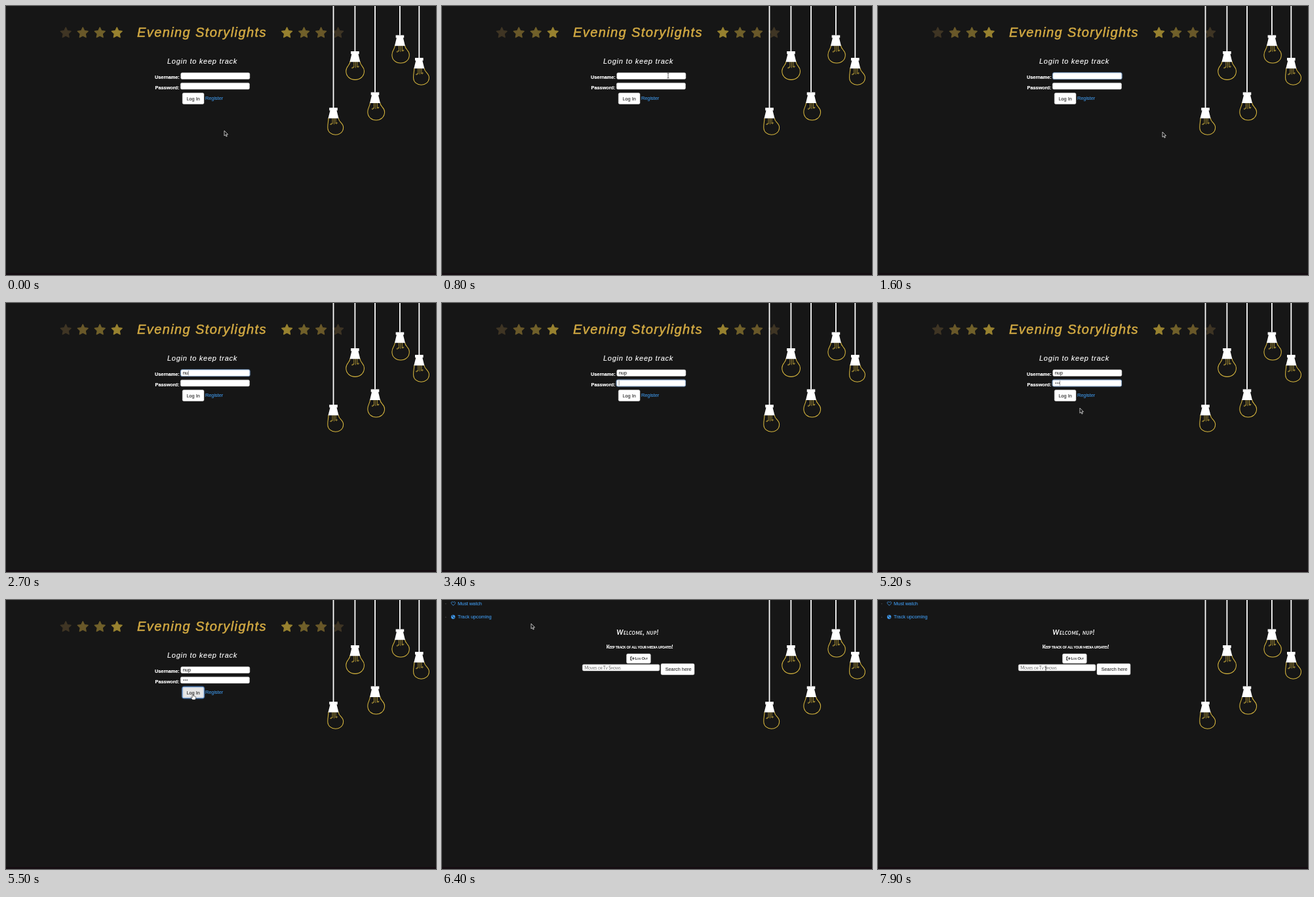
An HTML page for the animation above (8000 ms loop, 656x410 px).

```html
<!DOCTYPE html>
<html lang="en">
<head>
<meta charset="utf-8">
<title>Login walkthrough</title>
<style>
  html, body { margin: 0; width: 100%; height: 100%; overflow: hidden; background: #161616; }
  svg { display: block; }
  text { font: 7.3px "Liberation Sans", Arial, sans-serif; fill: #fff; white-space: pre; }
  .title { font-size: 20px; font-style: italic; letter-spacing: 1.4px; fill: #d4ab43; stroke: #d4ab43; stroke-width: .5; }
  .sub { font-size: 11px; font-style: italic; letter-spacing: .74px; stroke: #fff; stroke-width: .15; }
  .label { font-weight: 700; stroke: #fff; stroke-width: .2; }
  .link { fill: #3f98ea; stroke: #3f98ea; stroke-width: .1; }
  .dark { fill: #2c2c2c; }
  text.dark { stroke: #2c2c2c; stroke-width: .12; }
  .comic { font-family: Lato, "Open Sans", sans-serif; font-variant: small-caps; font-weight: 700; }
  .hello { font-size: 10.5px; font-style: italic; letter-spacing: .5px; }
  .tagline { font-size: 6.8px; font-weight: 900; letter-spacing: -.25px; }
  .out { font-size: 5.9px; letter-spacing: -.2px; fill: #2c2c2c; }
  .hint { font-size: 6.7px; font-weight: 400; letter-spacing: -.22px; fill: #666; }
  .field { fill: #fff; stroke: #ccc; stroke-width: .5; }
  .ring { fill: none; stroke: #86b4e6; stroke-width: .6; filter: drop-shadow(0 0 1px rgba(80, 140, 215, .5)); }
  #btnRing { stroke: #5a93d8; stroke-width: 1; }
  .wire { stroke: #fff; stroke-width: 1.8; }
  .glass { fill: none; stroke: #d9b83e; stroke-width: 1.05; stroke-linecap: round; }
  .thin { stroke-width: .7; }
  .icon { fill: none; stroke: #3f98ea; stroke-width: .8; stroke-linejoin: round; }
  .star { stroke-width: 1.4; stroke-linejoin: round; }
  .caret { fill: #333; }
  .pointer { fill: #111; stroke: #fff; stroke-width: .7; stroke-linejoin: round; }
</style>
</head>
<body>
<svg width="656" height="410" viewBox="0 0 656 410">
  <rect width="656" height="410" fill="#161616"/>
  <rect y="407" width="656" height="3" fill="#150d12"/>

  <g id="login">
    <g id="stars"></g>
    <text class="title" x="200" y="47.3">Evening Storylights</text>
    <text class="sub" x="246" y="87.8">Login to keep track</text>
    <text class="label" x="227" y="111.2">Username:</text>
    <text class="label" x="227.6" y="126.5">Password:</text>
    <rect class="field" x="266.7" y="101.8" width="105.2" height="9.7" rx="2"/>
    <rect class="field" x="266.3" y="117.2" width="105.2" height="9.7" rx="2"/>
    <rect class="ring" id="userRing" x="266.5" y="101.6" width="105.6" height="10.1" rx="2.2"/>
    <rect class="ring" id="passRing" x="266.1" y="117" width="105.6" height="10.1" rx="2.2"/>
    <text class="dark" id="user" x="269.8" y="109"></text>
    <g id="dots" class="dark"></g>
    <rect class="caret" id="caret" width=".5" height="7.4"/>
    <rect class="field" id="loginBtn" x="269.2" y="132.5" width="32.8" height="17" rx="2"/>
    <rect class="ring" id="btnRing" x="268.9" y="132.2" width="33.4" height="17.6" rx="2.2"/>
    <text class="dark" x="275.5" y="143.6">Log In</text>
    <text class="link" x="304" y="143.2">Register</text>
  </g>

  <g id="home">
    <circle cx="5.7" cy="5.8" r=".8" fill="#444"/>
    <circle cx="5.7" cy="26.3" r=".8" fill="#444"/>
    <path class="icon" d="M17.2 8.4L14.5 5.6C13 3.5 15.8 1.4 17.2 3.7C18.6 1.4 21.4 3.5 19.9 5.6Z"/>
    <text class="link" x="24" y="7.9">Must watch</text>
    <circle class="link" cx="17" cy="25.8" r="3.1"/>
    <path d="M15.8 23.6l1.4.5-.9 1.2-1.1.3zM17.4 26l1.6.2-.7 1.6-.9-.3z" fill="#161616"/>
    <text class="link" x="24" y="28.3">Track upcoming</text>
    <text class="comic hello" x="266.3" y="52.8">Welcome, nup!</text>
    <text class="comic tagline" x="250.8" y="74">Keep track of all your media updates!</text>
    <rect class="field" x="281.5" y="82" width="36.8" height="14.6" rx="2"/>
    <path d="M290 86.8h-2.3v4.8h2.3M289.3 89.2h3.6M291.3 87.3l2 1.9-2 1.9" fill="none" stroke="#222" stroke-width="1"/>
    <text class="comic out" x="294.6" y="91.4">Log Out</text>
    <rect class="field" x="214.3" y="98.2" width="117.6" height="9.7" rx="2"/>
    <text class="comic hint" x="217.2" y="105.6">Movies or Tv Shows</text>
    <rect class="field" x="334" y="97" width="51" height="17" rx="2"/>
    <text class="dark" x="340.7" y="108.2">Search here</text>
  </g>

  <g id="bulbs"></g>

  <g id="pointer" class="pointer">
    <path id="arrow" d="M0 0V7.8L1.8 6.2L3 9L4.3 8.4L3.1 5.7H5.5Z"/>
    <path id="hand" d="M-.8 .6Q0-.6 .8 .6V3.6Q1.6 2.9 2.1 3.8Q3 3.3 3.5 4.2Q4.6 4 4.6 5.2V6.8L3.7 9H-.6L-3 5.7Q-2.7 4.4-.8 6Z" style="fill:#fff;stroke:#222;stroke-width:.6"/>
    <path id="beam" d="M-1.5-4Q0-4 0-3V3Q0 4-1.5 4M1.5-4Q0-4 0-3M0 3Q0 4 1.5 4" style="fill:none;stroke:#222"/>
  </g>
</svg>
<script>
  const $ = id => document.getElementById(id);
  const LOOP = 8000, STEP = 100;
  const NAME = 'nup';
  const TEXT_X = 269.8, LETTER = 4.06, DOT = 2.55;
  const PRESS = 5400, LOGGED_IN = 5600;

  function drawStar(cx, cy, fill) {
    const points = Array.from({ length: 10 }, (_, i) => {
      const a = -Math.PI / 2 + i * Math.PI / 5, r = i % 2 ? 4.1 : 8.3;
      return `${cx + r * Math.cos(a)},${cy + r * Math.sin(a)}`;
    });
    return `<polygon class="star" points="${points.join(' ')}" fill="${fill}" stroke="${fill}"/>`;
  }

  const shades = ['#3f3524', '#695829', '#70602a', '#97812f'];
  $('stars').innerHTML = shades.map((c, i) =>
    drawStar(91.2 + 26 * i, 41, c) + drawStar(506.6 - 26 * i, 41, c)).join('');

  // The more a bulb leans to the right, the smaller its glass.
  function drawBulb(x, top, lean) {
    const half = 14 - .65 * lean, bottom = 43.5 - .7 * lean, wide = 30;
    const deep = wide + (bottom - wide) / .75;
    const l = lean - half, r = lean + half;
    return `<path class="wire" d="M${x} 0V${top}"/><g transform="translate(${x} ${top})">
      <path class="glass" d="M-7.5 16C-7.5 21 ${l} 23 ${l} ${wide}C${l} ${deep} ${r} ${deep} ${r} ${wide}C${r} 23 8 22 7.7 16"/>
      <path class="glass thin" d="M-1.5 16V24Q-3.5 27-5 25.5Q-4-23.5 -1.5 24M3.5 16V24Q5 21.5 6 23Q5.5 25.5 3.5 24M1 16V25"/>
      <path d="M-6.3 0H6.3V4.2H5L8 16.3H-8L-5 4.2H-6.3Z" fill="#fff"/></g>`.replace('-4-23.5 ', '-4 23.5 ');
  }
  const bulbs = [[499.5, 155, 3.2], [532.4, 69, .2], [563, 131.6, 1.7], [600.9, 44.4, 1.2], [630.3, 79, 3.2]];
  $('bulbs').innerHTML = bulbs.map(b => drawBulb(...b)).join('');

  $('dots').innerHTML = [0, 1, 2].map(i =>
    `<circle cx="${271.2 + DOT * i}" cy="122" r=".85"/>`).join('');

  // Each move: start time, end time, destination
  const moves = [
    [0, 300, 385, 395], [300, 500, 588, 250], [500, 700, 400, 53], [700, 800, 345, 106],
    [1000, 1600, 434, 192], [2300, 4500, 414, 218], [4600, 4800, 373.5, 209],
    [4800, PRESS, 285, 143], [6100, 6400, 136, 36], [6900, 7800, 246, 107], [7800, 7900, 256, 106]
  ];

  const clamp = v => Math.min(1, Math.max(0, v));
  const ease = k => k * k * (3 - 2 * k);
  const fade = (t, start) => clamp((t - start + STEP) / 300);
  const between = (t, a, b) => t >= a && t < b;
  const typed = (t, times) => times.filter(s => t >= s).length;
  const inside = (x, y, l, top, r, b) => x > l && x < r && y > top && y < b;
  const show = (el, on) => el.setAttribute('visibility', on ? 'inherit' : 'hidden');

  function pointerAt(t) {
    let x = 333, y = 190;
    for (const [start, end, toX, toY] of moves) {
      const k = ease(clamp((t - start) / (end - start)));
      x += (toX - x) * k;
      y += (toY - y) * k;
    }
    return [x, y];
  }

  function drawForm(t) {
    const letters = typed(t, [2200, 2700, 2900]);
    const marks = typed(t, [3800, 4200, 4400]);
    $('user').textContent = NAME.slice(0, letters);
    [...$('dots').children].forEach((dot, i) => show(dot, i < marks));

    $('userRing').style.opacity = Math.min(fade(t, 1100), 1 - fade(t, 3200));
    $('passRing').style.opacity = Math.min(fade(t, 3200), 1 - fade(t, PRESS - STEP));
    $('btnRing').style.opacity = clamp((t - PRESS + STEP) / 200);
    $('loginBtn').style.fill = t < PRESS ? '#fff' : '#e6e6e6';

    const inPass = t >= 3200;
    $('caret').setAttribute('x', TEXT_X + (inPass ? DOT * marks : LETTER * letters));
    $('caret').setAttribute('y', inPass ? 118.3 : 102.9);
    show($('caret'), between(t, 1100, 1600) || between(t, 2000, PRESS));
  }

  function drawPointer(t) {
    const [x, y] = pointerAt(t);
    const beam = t >= LOGGED_IN ? inside(x, y, 214, 98, 332, 108)
      : inside(x, y, 266, 101, 372, 112) || inside(x, y, 266, 117, 372, 127);
    const hand = between(t, 4800, 6200) && inside(x, y, 269, 132, 302, 150);
    $('pointer').setAttribute('transform', `translate(${x} ${y})`);
    show($('pointer'), !between(t, 2200, 4600));
    show($('beam'), beam);
    show($('hand'), hand);
    show($('arrow'), !beam && !hand);
  }

  function render(now) {
    const t = Math.floor((now % LOOP) / STEP) * STEP;
    $('login').style.display = t < LOGGED_IN ? '' : 'none';
    $('home').style.display = t < LOGGED_IN ? 'none' : '';
    drawForm(t);
    drawPointer(t);
  }

  const start = performance.now();
  function tick() {
    render(performance.now() - start);
    requestAnimationFrame(tick);
  }
  tick();
</script>
</body>
</html>
```
